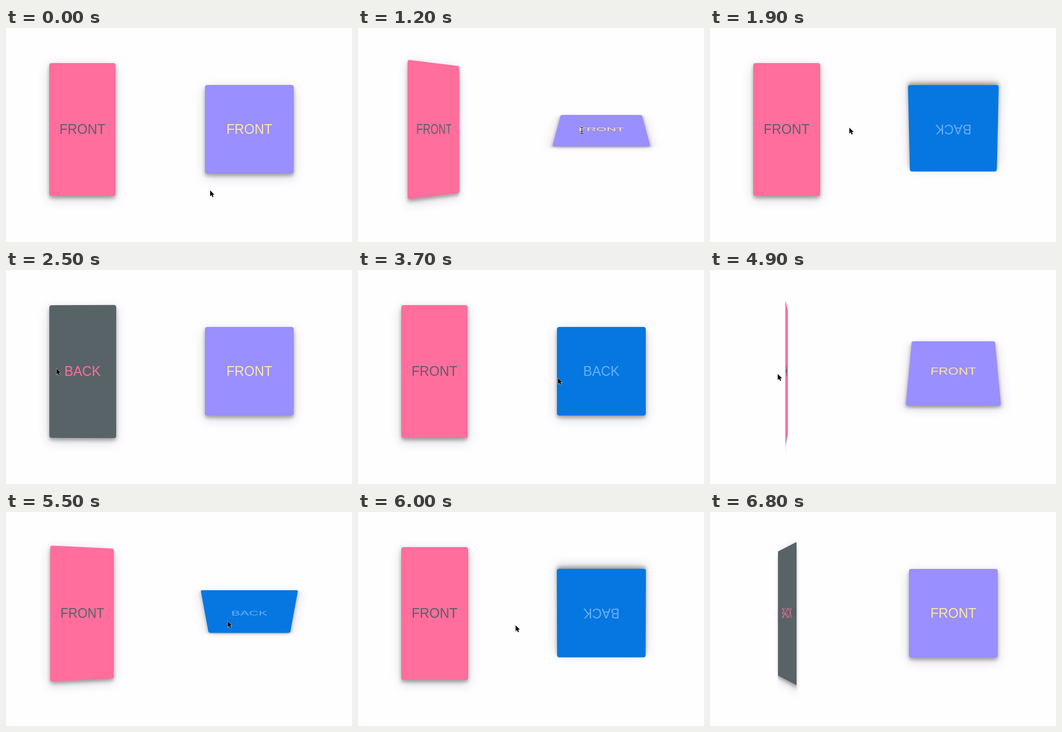
An HTML page for the animation above (6.9 s loop, 600 by 372 pixels).

```html
<!DOCTYPE html>
<html lang="en">
<head>
<meta charset="utf-8">
<title>Flip cards</title>
<style>
  html, body { margin: 0; width: 100%; height: 100%; overflow: hidden; background: #fefdff; }
  .box { position: absolute; perspective: 770px; }
  #tall { left: 74.8px; top: 61px; width: 115.5px; height: 231px; }
  #wide { left: 345px; top: 99px; width: 154px; height: 154px; }
  .card {
    width: 100%; height: 100%; border-radius: 4px;
    display: flex; align-items: center; justify-content: center;
    font: 23.1px "Liberation Sans", Arial, sans-serif;
    box-shadow: 0 4px 6px rgba(0,0,0,.3), 0 6px 20px rgba(0,0,0,.17);
  }
  svg { position: absolute; left: 0; top: 0; overflow: visible; }
  #beam { fill: none; }
</style>
</head>
<body>
<div class="box" id="tall"><div class="card"></div></div>
<div class="box" id="wide"><div class="card"></div></div>
<svg width="12" height="18">
  <defs><path id="bar" d="M-3-6Q0-6 0-4Q0-6 3-6M0-4V4M-3 6Q0 6 0 4Q0 6 3 6M-1.5 2H1.5"/></defs>
  <path id="arrow" d="M0 0V10.5L2.4 8.2L4 12L5.8 11.2L4.2 7.5H7.4Z" stroke="#fff" paint-order="stroke"/>
  <g id="beam">
    <use href="#bar" stroke="#fff" stroke-width="2.6"/>
    <use href="#bar" stroke="#222" stroke-width="1.2"/>
  </g>
</svg>
<script>
const LOOP = 6900, STEP = 100, FLIP = 600, LAG = 30;

// Times the pointer enters and leaves a card; visits alternate tall, wide.
const visits = [
  [350, 914], [1056, 1850], [1970, 2610], [2690, 3732], [4195, 4450],
  [4470, 4730], [4743, 5150], [5270, 5987], [6080, 6650]
];

// edge: side facing the other card; reach: px the pointer goes in per ms of visit
const cards = [
  { id: 'tall', axis: 'Y', x: 132.5, y: 176.5, edge: 190, reach: -.178,
    front: ['#ff6e9d', '#586166'], back: ['#586367', '#ff6e9d'] },
  { id: 'wide', axis: 'X', x: 422, y: 176, edge: 345, reach: .055,
    front: ['#998fff', '#ffe79c'], back: ['#0677e0', '#66b0fb'] }
];
cards.forEach((c, n) => {
  c.el = document.querySelector(`#${c.id} .card`);
  c.hover = visits.filter((v, i) => i % 2 === n).flat();
});

const mix = (a, b, k) => a + (b - a) * k;

// cubic-bezier(.25, .1, .25, 1)
function ease(x) {
  if (x <= 0 || x >= 1) return x <= 0 ? 0 : 1;
  let lo = 0, hi = 1, s;
  for (let i = 0; i < 24; i++) {
    s = (lo + hi) / 2;
    if (.75 * s * (1 - s) + s ** 3 < x) lo = s; else hi = s;
  }
  return .3 * s * (1 - s) ** 2 + 3 * s * s * (1 - s) + s ** 3;
}

// A flip reversed midway takes proportionally less time.
function pose(hover, t) {
  let from = 0, to = 0, start = 0;
  const at = time => from === to ? to
    : mix(from, to, ease((time - start) / (FLIP * Math.abs(to - from) / 180)));
  hover.forEach((time, i) => {
    if (time > t) return;
    from = at(time);
    to = i % 2 ? 0 : 180;
    start = time;
  });
  return { angle: at(t), active: to === 180 };
}

// The pointer runs from edge to edge between visits and dips into the card during one.
function pointerAt(t) {
  const i = visits.findIndex(v => t < v[1]);
  if (i < 0) return null;
  const [enter, leave] = visits[i], card = cards[i % 2];
  const lead = Math.max(0, 1 - (t - LAG) / (visits[0][0] - LAG));
  const y = 167 + .004 * t - 6 * Math.cos(t / 388) + 121 * lead;
  if (t < enter) {
    const [since, x] = i ? [visits[i - 1][1], cards[(i - 1) % 2].edge] : [LAG, 354];
    return [mix(x, card.edge, (t - since) / (enter - since)), y];
  }
  const k = 2 * (t - enter) / (leave - enter) - 1;
  return [card.edge + card.reach * (leave - enter) * (1 - k ** 8), y];
}

const show = (id, on) => document.getElementById(id).style.display = on ? '' : 'none';

function draw(t) {
  const pointer = pointerAt(t + LAG);
  let overText = false;
  for (const c of cards) {
    const { angle, active } = pose(c.hover, t);
    const isBack = angle > 90;
    const [fill, ink] = isBack ? c.back : c.front;
    // The back of the wide card is upright only while hovered.
    const turn = isBack ? ` rotate${active ? c.axis : 'Y'}(180deg)` : '';
    c.el.style.transform = `rotate${c.axis}(${angle}deg)${turn}`;
    c.el.style.background = fill;
    c.el.style.color = ink;
    c.el.textContent = isBack ? 'BACK' : 'FRONT';
    if (pointer) {
      const squash = Math.abs(Math.cos(angle * Math.PI / 180));
      const w = (isBack ? 31 : 40) * (c.axis === 'Y' ? squash : 1);
      const h = 13 * (c.axis === 'X' ? squash : 1);
      overText ||= Math.abs(pointer[0] - c.x) < w && Math.abs(pointer[1] - c.y) < h;
    }
  }
  show('arrow', pointer && !overText);
  show('beam', pointer && overText);
  if (pointer) document.querySelector('svg').style.transform = `translate(${pointer[0]}px, ${pointer[1]}px)`;
}

const begin = performance.now();
function tick() {
  const t = (performance.now() - begin) % LOOP;
  draw(Math.floor(t / STEP) * STEP);
  requestAnimationFrame(tick);
}
tick();
</script>
</body>
</html>
```
